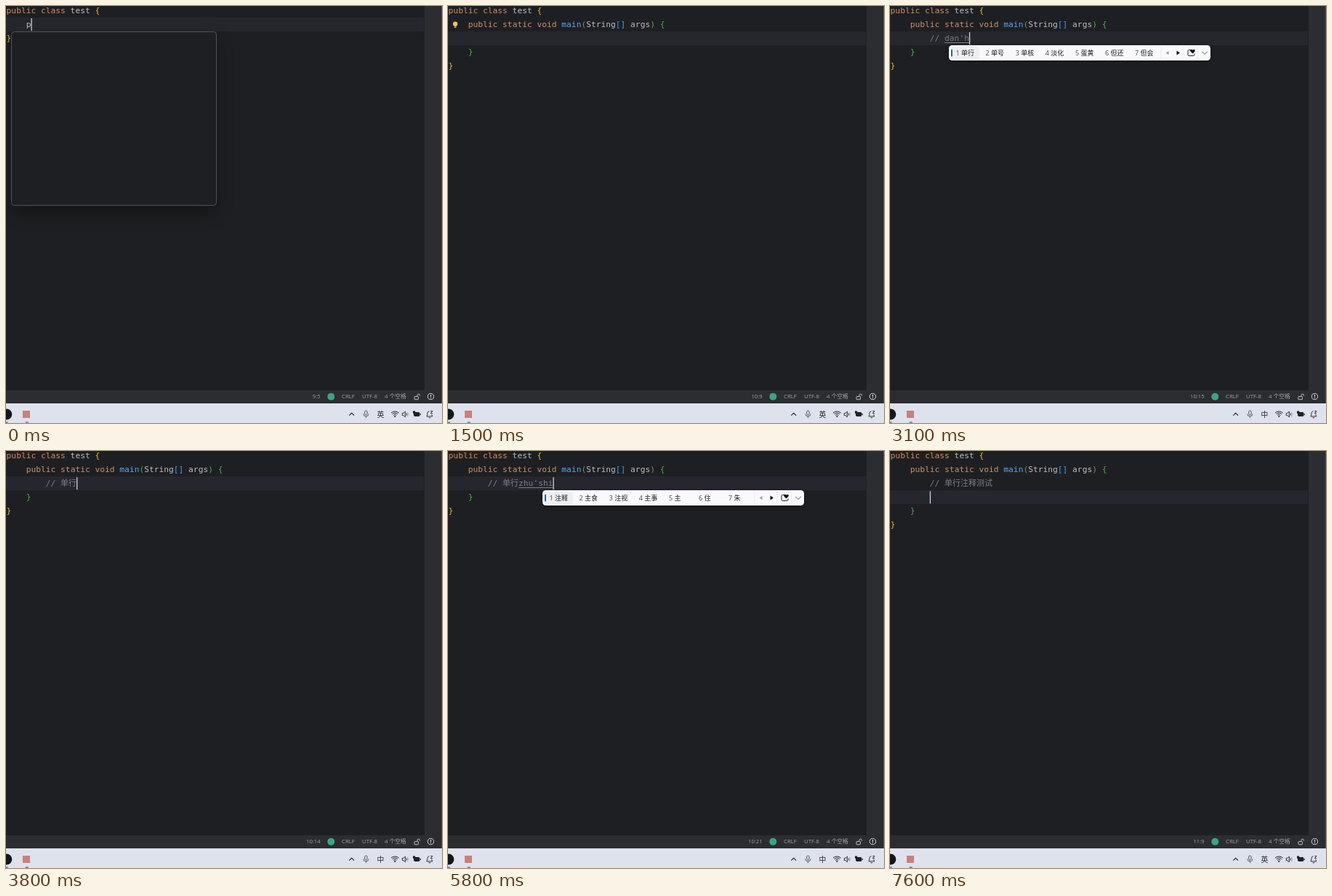
These frames come from a looping animation (600 px wide and 574 px high, 8 s). An HTML page with a canvas:

```html
<!DOCTYPE html>
<html lang="zh-CN">
<head>
<meta charset="utf-8">
<title>Typing a comment</title>
<style>
html, body { margin: 0; width: 100%; height: 100%; overflow: hidden; background: #1e1f22; }
canvas { display: block; width: 600px; height: 574px; }
</style>
</head>
<body>
<canvas id="stage" width="600" height="574"></canvas>
<script>
const ctx = document.getElementById('stage').getContext('2d');
const LOOP = 8000;
const CELL = 6.77, HAN = 11, LINE = 19.1, LEFT = 0.6;
const CODE_FONT = '11.25px "DejaVu Sans Mono", monospace';
const HAN_FONT = '11px "Noto Sans CJK SC", "Noto Sans CJK", sans-serif';
const uiFont = size => `${size}px "Open Sans", "Noto Sans CJK SC", "Noto Sans CJK", sans-serif`;
const C = {
  keyword: '#cf8e6d', text: '#bcbec4', comment: '#7a7e85', method: '#56a8f5',
  yellow: '#e8ba36', green: '#54a857', blue: '#359ff4',
  editor: '#1e1f22', panel: '#2b2d30', current: '#26272e', ink: '#202126'
};

const WORDS = {
  d: '的 到 大 等 都 对 多', da: '大 打 达 答 搭 哒 耷', dan: '单 但 蛋 淡 担 丹 胆',
  "dan'h": '单行 单号 单核 淡化 蛋黄 但还 但会', "dan'ha": '单行 但还 蛋行 单 但 蛋 淡',
  "dan'hang": '单行 弹行 单 但 蛋 淡 担',
  z: '在 这 中 再 最 做 只', zh: '这 中 只 着 之 找 真', zhu: '主 住 祝 猪 朱 注 著',
  "zhu'c": '注册 主持 主场 支持 主 住 朱', "zhu'ce": '注册 主策 主测 主 ® 朱 住',
  "zhu's": '注释 助手 注射 主食 住所 主 住', "zhu'sh": '注释 助手 注射 主食 注视 主 住',
  "zhu'shi": '注释 主食 注视 主事 主 住 朱',
  c: '从 才 出 吃 此 次 层', ce: '测 侧 册 策 厕 恻 龃', "ce's": '测 侧 册 策 厕 恻 龃',
  "ce'sh": '测试 测 侧 册 策 厕 恻', "ce'shi": '测试 侧视 测时 测 侧 册 策'
};

const TEMPLATES = {
  psf: 'public static final', psfi: 'public static final int',
  psfs: 'public static final String', psvm: 'main() 方法声明'
};
const COMPLETIONS = ['public', 'private', 'protected', ...Object.keys(TEMPLATES)];

// Each step overrides part of the state from its time on.
const STEPS = [
  [0, { typed: 'p', pos: '9:5', list: false, open: false, line: 1, caret: true,
        bulb: false, note: '', comp: '', popup: 0, lang: '英', wave: false, hint: false, done: false }],
  [100, { list: true, pos: '9:6' }],
  [300, { typed: 'ps' }], [400, { pos: '9:7' }],
  [500, { typed: 'psv' }], [600, { pos: '9:8' }],
  [700, { typed: 'psvm' }], [800, { pos: '9:9' }],
  [900, { open: true, line: 2 }], [1000, { pos: '10:9' }],
  [1500, { caret: false, bulb: true }],
  [2000, { caret: true, bulb: false, note: '/' }],
  [2100, { note: '//', pos: '10:10' }],
  [2200, { note: '// ', pos: '10:11', lang: '中' }],
  [2400, { pos: '10:12' }],
  [2700, { comp: 'd', popup: 81 }],
  [2800, { comp: 'da', pos: '10:13' }], [2900, { comp: 'dan', pos: '10:14' }],
  [3000, { comp: "dan'h", pos: '10:15' }],
  [3200, { comp: "dan'ha", pos: '10:17' }], [3300, { comp: "dan'hang", pos: '10:20' }],
  [3500, { note: '// 单行', comp: '', popup: 0 }], [3600, { pos: '10:14' }],
  [3900, { comp: 'z', popup: 130 }],
  [4000, { comp: 'zh', pos: '10:15' }], [4100, { comp: 'zhu', pos: '10:16' }],
  [4200, { comp: "zhu'c", pos: '10:17' }], [4300, { comp: "zhu'ce", pos: '10:19' }],
  [4400, { pos: '10:20', hint: true }], [5000, { wave: true }],
  [5200, { comp: "zhu'c", wave: false, hint: false, pos: '10:19' }],
  [5300, { comp: 'zhu', pos: '10:17' }],
  [5600, { comp: "zhu's" }], [5700, { comp: "zhu'sh", pos: '10:19' }],
  [5800, { comp: "zhu'shi", pos: '10:21' }],
  [5900, { note: '// 单行注释', comp: '', popup: 0 }], [6000, { pos: '10:16' }],
  [6200, { comp: 'c', popup: 125 }], [6300, { comp: 'ce', pos: '10:17' }],
  [6400, { pos: '10:18' }],
  [6700, { comp: "ce's" }], [6800, { comp: "ce'sh", pos: '10:20' }],
  [6900, { comp: "ce'shi", pos: '10:21' }], [7000, { pos: '10:22' }],
  [7200, { note: '// 单行注释测试', comp: '', popup: 0 }], [7300, { pos: '10:18' }],
  [7600, { done: true, line: 3, pos: '11:9', lang: '英' }]
];

const stateAt = t => Object.assign({}, ...STEPS.filter(s => s[0] <= t).map(s => s[1]));
const col = n => LEFT + n * CELL;
const lineTop = n => 16 + (n - 1) * LINE;
const baseline = n => 9.8 + n * LINE;

function rect(x, y, w, h, color) {
  ctx.fillStyle = color;
  ctx.fillRect(x, y, w, h);
}

function rounded(x, y, w, h, r, fill, stroke) {
  ctx.beginPath();
  ctx.roundRect(x, y, w, h, r);
  if (fill) { ctx.fillStyle = fill; ctx.fill(); }
  if (stroke) { ctx.strokeStyle = stroke; ctx.lineWidth = 1; ctx.stroke(); }
}

function disc(x, y, r, color) {
  ctx.beginPath();
  ctx.arc(x, y, r, 0, 7);
  ctx.fillStyle = color;
  ctx.fill();
}

function stroke(path, color, width = 1) {
  ctx.strokeStyle = color;
  ctx.lineWidth = width;
  ctx.stroke(new Path2D(path));
}

function fill(path, color) {
  ctx.fillStyle = color;
  ctx.fill(new Path2D(path));
}

function label(text, x, y, size, color, align = 'left') {
  ctx.font = uiFont(size);
  ctx.textAlign = align;
  ctx.fillStyle = color;
  ctx.fillText(text, x, y);
  ctx.textAlign = 'left';
}

// Draws code that may mix Latin and Han characters; returns the end position.
function code(text, x, y, color) {
  ctx.fillStyle = color;
  for (const run of text.match(/[\u4e00-\u9fff]|[^\u4e00-\u9fff]+/g) || []) {
    const han = /[\u4e00-\u9fff]/.test(run);
    ctx.font = han ? HAN_FONT : CODE_FONT;
    ctx.fillText(run, x, y);
    x += han ? HAN : run.length * CELL;
  }
  return x;
}

function codeLine(n, indent, parts) {
  let x = col(indent);
  for (const [text, color] of parts) x = code(text, x, baseline(n), color);
  return x;
}

function drawEditor(s) {
  rect(0, 0, 600, 574, C.editor);
  rect(0, Math.round(lineTop(s.line)), 575, 19, C.current);
  rect(576, 0, 24, 529, C.panel);
  codeLine(0, 0, [['public class ', C.keyword], ['test ', C.text], ['{', C.yellow]]);

  let caretX;
  if (!s.open) {
    caretX = codeLine(1, 4, [[s.typed, C.text]]);
    codeLine(2, 0, [['}', C.yellow]]);
  } else {
    codeLine(1, 4, [['public static void ', C.keyword], ['main', C.method], ['(', C.green],
      ['String', C.text], ['[]', C.blue], [' args', C.text], [')', C.green], [' {', C.green]]);
    const start = codeLine(2, 8, [[s.note, C.comment]]);
    caretX = code(s.comp, start, baseline(2), C.comment);
    if (s.comp) rect(start, Math.round(baseline(2)) + 2, caretX - start, 1, C.comment);
    if (s.wave) drawWave(start, caretX, baseline(2) + 4);
    if (s.done) caretX = col(8);
    const end = s.done ? 4 : 3;
    codeLine(end, 4, [['}', C.green]]);
    codeLine(end + 1, 0, [['}', C.yellow]]);
  }
  if (s.caret) rect(caretX, lineTop(s.line) + 1, 1.3, LINE - 2, '#ced0d6');
  if (s.bulb) {
    disc(10, 24.6, 3.2, '#f2c55c');
    rect(8.6, 26.5, 2.8, 2, '#f2c55c');
    rect(8.6, 29, 2.8, 1, '#b9bbc0');
  }
}

function drawWave(x0, x1, y) {
  ctx.beginPath();
  for (let x = x0; x <= x1; x += 0.5) ctx.lineTo(x, y + Math.sin((x - x0) * 1.6));
  ctx.strokeStyle = '#5d8a6c';
  ctx.lineWidth = 0.9;
  ctx.stroke();
}

function drawCompletion(s) {
  const rows = COMPLETIONS.filter(word => word.startsWith(s.typed));
  const height = s.typed === 'p' ? 238 : rows.length * LINE + 27;
  ctx.save();
  ctx.shadowColor = 'rgba(0,0,0,.35)';
  ctx.shadowBlur = 22;
  ctx.shadowOffsetY = 10;
  rounded(8, 36, 281, height, 4, C.editor);
  ctx.restore();
  rounded(7.5, 35.5, 282, height + 1, 4, C.editor, '#515358');
  if (!s.list) return;
  rows.forEach((word, i) => {
    const y = 39 + i * LINE, base = y + 13.5;
    if (!i) rounded(11, y, 275, LINE, 3, '#2e436e');
    const x = code(s.typed, 28, base, C.method);
    code(word.slice(s.typed.length), x, base, C.text);
    if (TEMPLATES[word]) {
      rounded(15, y + 6, 7, 7, 1.5, null, '#8c8f96');
      label(TEMPLATES[word], 281, base, 9, '#868a91', 'right');
    }
  });
  rect(9, 36 + height - 20, 279, 1, '#393b40');
  label('按 Enter 插入，按 Tab 替换', 15, 36 + height - 6.5, 8.5, '#868a91');
}

function drawCandidates(s) {
  const x = s.popup;
  ctx.save();
  ctx.shadowColor = 'rgba(0,0,0,.4)';
  ctx.shadowBlur = 5;
  ctx.shadowOffsetY = 1;
  rounded(x, 54, 360, 21, 4.5, '#f9f9fb');
  ctx.restore();
  rounded(x + 3, 56, 39, 17, 3, '#eeeff1');
  rounded(x + 3, 59.5, 2, 10, 1, '#34667c');
  WORDS[s.comp].split(' ').forEach((word, i) => {
    const left = x + 9.5 + i * 41.1;
    label(i + 1, left, 68, 9, '#44464b');
    label(word, left + 7.5, 68, 9, '#1b1c1f');
  });
  for (const dx of [291.5, 322.5, 342]) rect(x + dx, 55, 0.8, 19, '#e8e9ec');
  ctx.save();
  ctx.translate(x, 0);
  fill('M302.5 62l-4 2.5l4 2.5z', '#9a9b9f');
  fill('M313.5 61.5l4.5 3l-4.5 3z', '#111');
  stroke('M333 60.5h-2.5q-1.5 0-1.5 1.5v5q0 1.5 1.5 1.5h6q1.5 0 1.5-1.5v-1.5', C.ink);
  fill('M335.5 65.5l-3-3c-1.2-2 1.7-3.8 3-1.8c1.3-2 4.2-.2 3 1.8z', '#111');
  stroke('M348 62.7l4 3.8l4-3.8', '#55565a', 0.9);
  ctx.restore();
}

function drawStatus(s) {
  const gray = '#a0a3a9';
  rect(0, 529, 600, 18, C.panel);
  if (s.hint) label("zhu'ce' 中", 22.5, 540.3, 7.7, gray, 'right');
  label(s.pos, 432.5, 540.3, 7.6, gray, 'right');
  disc(447.3, 537.7, 5, '#3aa583');
  label('CRLF', 462, 540.3, 7.8, gray);
  label('UTF-8', 490, 540.3, 7.8, gray);
  label('4 个空格', 521, 540.3, 7.8, gray);
  rounded(562, 537.5, 5.5, 4.2, 0.8, null, '#c4c6cc');
  stroke('M566 537.5v-1.5q0-2 1.7-2t1.7 2v.8', '#c4c6cc', 0.9);
  stroke('M588.6 537.5a4.1 4.1 0 1 1-8.2 0a4.1 4.1 0 1 1 8.2 0', '#d4d6da');
  rect(583.9, 535, 1.2, 3, '#d4d6da');
  rect(583.9, 538.8, 1.2, 1.2, '#d4d6da');
}

function drawTaskbar(s) {
  rect(0, 547, 600, 27, '#dee2ed');
  disc(0.8, 562, 7.5, '#11171c');
  rect(23, 557, 10, 10, '#c9807d');
  rounded(-3, 572.2, 6, 1.8, 0.9, '#7d828c');
  rounded(26.5, 572.2, 4.5, 1.8, 0.9, '#7d828c');

  stroke('M472.3 563.7l3.4-3.4l3.4 3.4', C.ink, 1.1);
  rounded(493.7, 557, 3.4, 6, 1.7, null, '#4a565c');
  stroke('M491.8 561.5q0 3.4 3.6 3.4t3.6-3.4M495.4 565v2.2', '#4a565c', 0.9);
  label(s.lang, 515.3, 565.6, 9.8, C.ink, 'center');

  for (const r of [3, 5.3, 7.5]) {
    ctx.beginPath();
    ctx.arc(535.3, 565.5, r, -2.36, -0.78);
    ctx.strokeStyle = C.ink;
    ctx.lineWidth = 1;
    ctx.stroke();
  }
  disc(535.3, 564.9, 1, C.ink);
  stroke('M545.3 560.4h1.6l2.5-2.2v7.6l-2.5-2.2h-1.6z', C.ink, 0.9);
  stroke('M551 560.4q1.2 1.6 0 3.2', C.ink, 0.9);
  stroke('M552.5 559q2.2 3 0 6', '#9a9da5', 0.8);
  rounded(561.5, 559.5, 7.5, 5, 1.2, C.ink, C.ink);
  rect(569.8, 561, 1, 2.2, C.ink);
  fill('M560 557.5h3.2v3q-1.6 1.4-3.2 0z', C.ink);
  stroke('M582.5 557.7q-2.6.6-2.6 3.2v2l-1 2h8l-1-2v-.8M581.6 566.5q1.3 1 2.6 0', C.ink, 0.9);
  stroke('M584.3 557.6h2.7l-2.7 3h2.7', C.ink, 0.9);
}

const start = performance.now();

function frame(now) {
  const s = stateAt(Math.max(0, now - start) % LOOP);
  drawEditor(s);
  if (!s.open) drawCompletion(s);
  if (s.popup) drawCandidates(s);
  drawStatus(s);
  drawTaskbar(s);
  rect(599, 0, 1, 547, '#47494d');
  requestAnimationFrame(frame);
}

requestAnimationFrame(frame);
</script>
</body>
</html>
```
